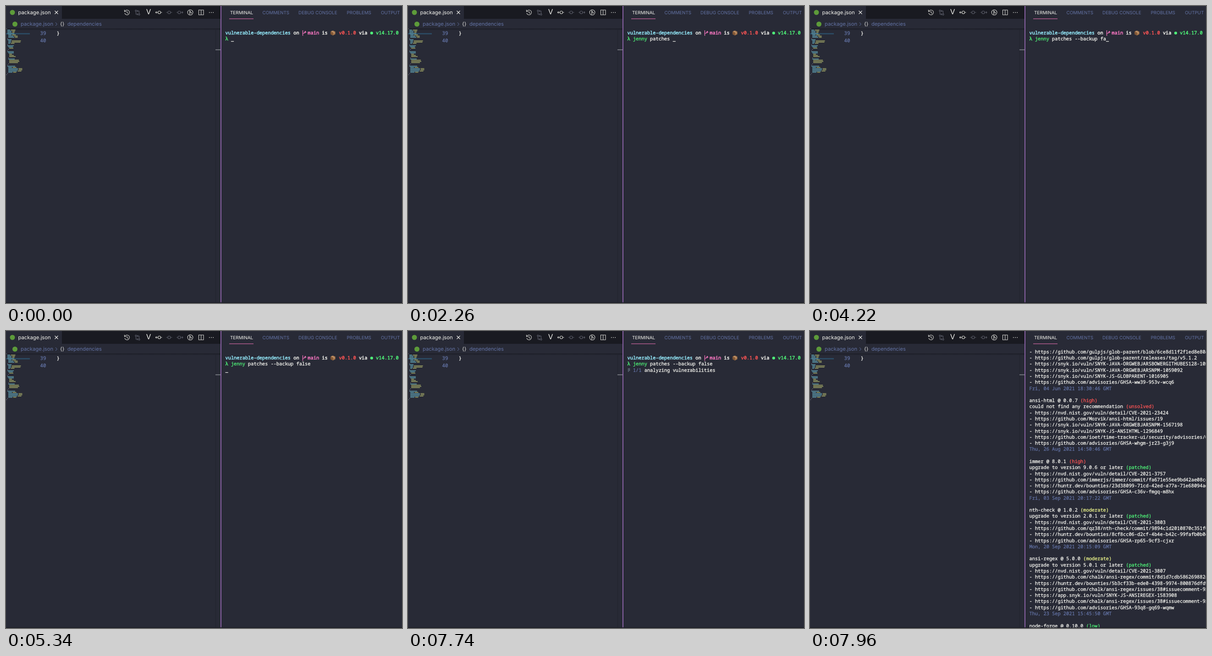
Recreate the animation shown at these times as an HTML page. Size 864x648 px, loop 8 s.

```html
<!DOCTYPE html>
<html lang="en">
<head>
<meta charset="utf-8">
<title>Terminal audit</title>
<style>
html, body { margin: 0; height: 100%; overflow: hidden; background: #282a36; }
svg { display: block; }
text { white-space: pre; text-rendering: geometricPrecision; font-family: Inter, sans-serif; }
.mono text {
  font-family: "Noto Sans Mono", "DejaVu Sans Mono", monospace;
  fill: currentColor; stroke: currentColor; stroke-width: .3px;
}
#term text { font-size: 10.33px; }
#prompt text { stroke-width: .5px; }
#tabs text { font-size: 9.9px; fill: #6272a4; }
#icons { fill: none; stroke: #d8d8d4; stroke-width: 1.1; }
#icons .dim { stroke: #5a5c68; }
</style>
</head>
<body>
<svg width="864" height="648" viewBox="0 0 864 648">
  <defs>
    <linearGradient id="shade" x2="0" y2="1">
      <stop stop-color="#1b1c25"/><stop offset="1" stop-color="#282a36"/>
    </linearGradient>
  </defs>
  <rect width="864" height="648" fill="#282a36"/>

  <!-- editor -->
  <rect x="122" width="346" height="28" fill="#191a21"/>
  <rect y="49" width="468" height="4" fill="url(#shade)"/>
  <g id="map"><rect y="59" width="52" height="3" fill="#2b4860"/></g>
  <circle cx="14" cy="14" r="5.5" fill="#5d9b3a"/>
  <circle cx="19.5" cy="39.5" r="5.5" fill="#5d9b3a"/>
  <g font-size="11.3" fill="#6272a4">
    <text x="26.5" y="18" fill="#f8f8f2">package.json</text>
    <text x="32" y="43.3">package.json</text>
    <text x="134" y="43.3" font-size="11.2">dependencies</text>
    <text x="118" y="43" fill="#e4e4e0" font-size="11">{}</text>
  </g>
  <path d="M106.5 10.5l7 7m0-7l-7 7" stroke="#f0f0ec" stroke-width="1.1"/>
  <path d="M108 36l3.5 3.5-3.5 3.5" fill="none" stroke="#6272a4"/>
  <g class="mono" font-size="10.8" color="#6272a4">
    <text x="74.5" y="62.7">39</text>
    <text x="74.5" y="78.9">40</text>
    <text x="110.5" y="62.7" color="#f8f8f2">}</text>
  </g>
  <path d="M457.5 50v598" stroke="#22232d"/>
  <path d="M457 95.5h11.5" stroke="#83858c" stroke-width="1.6"/>

  <g id="icons">
    <path d="M259.4 11.5a5.3 5.3 0 1 1-.4 4M258.5 8.3v3.7h3.7M264 10.8v3.7l2.8 1.6"/>
    <g class="dim">
      <circle cx="283.5" cy="10.5" r="1.6"/><circle cx="290.5" cy="18.5" r="1.6"/>
      <path d="M283.5 12v6h4m-1.6-1.8l1.8 1.8-1.8 1.8M290.5 17v-6h-4m1.6-1.8l-1.8 1.8 1.8 1.8"/>
    </g>
    <g><circle cx="334.5" cy="14" r="3"/><path d="M337.5 14h3M331.5 14h-5m2-2l-2 2 2 2"/></g>
    <g class="dim"><circle cx="356" cy="14" r="3"/><path d="M349.5 14h3.5m6 0h3.5"/></g>
    <g class="dim"><circle cx="378" cy="14" r="3"/><path d="M372 14h3m6 0h5m-2-2l2 2-2 2"/></g>
    <circle cx="402" cy="14" r="5.8"/>
    <path d="M401 9.5v9M401 11.5l3.5 3v2" stroke-width="1.3"/>
    <path d="M420.5 8.8h10.5v10.4h-10.5zM425.75 9v10"/>
    <path d="M443 14.3h1.6m2.6 0h1.6m2.6 0h1.6" stroke-width="1.6"/>
  </g>
  <text x="305.8" y="18.3" font-size="15.5" fill="#f0f0ec">V</text>

  <!-- panel -->
  <g id="tabs">
    <text x="489" y="17.7" style="fill:#f8f8f2">TERMINAL</text>
    <text x="559.5" y="17.7">COMMENTS</text>
    <text x="638" y="17.7">DEBUG CONSOLE</text>
    <text x="743.5" y="17.7">PROBLEMS</text>
    <text x="818" y="17.7">OUTPUT</text>
  </g>
  <path d="M487 27.8h53" stroke="#c9649f" stroke-width="1.2"/>
  <g id="term" class="mono">
    <g id="session">
      <g id="prompt"></g>
      <path d="M647.5 53v12M647.5 61.5q0-2.5 2.5-2.5h1q2 0 2-2.5M651 58l2-3 2 3" fill="none" stroke="#ff79c6" stroke-width="1.2"/>
      <path d="M708 56l5.3-2.6 5.3 2.6v5.6l-5.3 2.6-5.3-2.6z" fill="#a5754c"/>
      <path d="M708 56l5.3 2.4v5.8l-5.3-2.6z" fill="#7e5535"/>
      <path d="M710.5 54.8l5.3 2.4v2.4" fill="none" stroke="#d8b48a"/>
      <circle cx="797.8" cy="59" r="3.1" fill="#50fa7b"/>
      <g id="typed"></g>
      <g id="busy"></g>
      <rect id="cursor" width="6.2" height="1.2" fill="#f8f8f2"/>
    </g>
    <g id="report"></g>
  </g>
  <path d="M469 0v648" stroke="#a873c8" stroke-width="1.5"/>
  <path d="M0 647.2h864" stroke="#1b1c24" stroke-width="1.6"/>
</svg>

<script>
const $ = id => document.getElementById(id);
const LOOP = 8000, CELL = 6.2, LINE = 13.28;
const RED = '#ff5555', GREEN = '#50fa7b', YELLOW = '#f1fa8c', BLUE = '#6272a4',
      CYAN = '#95ecfd', PINK = '#ff79c6', WHITE = '#f8f8f2';
const colX = col => 478.5 + CELL * col;
const rowY = row => 48.9 + LINE * row;
const put = (col, row, str, color = WHITE) =>
  `<text x="${colX(col)}" y="${rowY(row)}" color="${color}">${str}</text>`;

// Minimap rows: indent, key width, value width
const MAP = `1 1,3 6 10,3 9 6,3 9 5,3 15,5 7 8,5 11 8,5 13 6,3 1,3 9,5 6 20,5 6 19,5 4 8,3 1,
3 14,5 10,7 0 9,5 1,3 1,3 14,5 12,7 0 6,7 0 10,7 0 14,5 1,5 14,7 0 21,7 0 22,7 0 19,5 1,3 1,
3 17,5 8 8,5 21 8,5 21 8,5 19 8,5 9 7,3 1,1 1`;
$('map').innerHTML += MAP.split(',').map((line, i) => {
  const [x, key, value = 0] = line.trim().split(' ').map(Number);
  const bar = (left, w, color) =>
    `<rect x="${left}" y="${49 + i * 2.63}" width="${w}" height="1.7" fill="${color}"/>`;
  return bar(x, key, key > 1 ? '#5b94a5' : '#777983') + bar(x + (key && key + 1.5), value, '#959a62');
}).join('');

$('prompt').innerHTML = [
  [0, 'vulnerable-dependencies', CYAN], [24, 'on', WHITE], [29, 'main', PINK], [34, 'is', WHITE],
  [40, 'v0.1.0', RED], [47, 'via', WHITE], [53, 'v14.17.0', GREEN]
].map(([col, str, color]) => put(col, 1, str, color)).join('') + put(0, 2, 'λ', GREEN);

$('busy').innerHTML = put(2, 3, '1/1', BLUE) + put(6, 3, 'analyzing vulnerabilities') + '<g id="spin"></g>';

const REPORT = `- https://github.com/gulpjs/glob-parent/blob/6ce8d11f2f1ed8e80a
- https://github.com/gulpjs/glob-parent/releases/tag/v5.1.2
- https://snyk.io/vuln/SNYK-JAVA-ORGWEBJARSBOWERGITHUBES128-1059
- https://snyk.io/vuln/SNYK-JAVA-ORGWEBJARSNPM-1059092
- https://snyk.io/vuln/SNYK-JS-GLOBPARENT-1016905
- https://github.com/advisories/GHSA-ww39-953v-wcq6
Fri, 04 Jun 2021 18:30:46 GMT

ansi-html @ 0.0.7 (high)
could not find any recommendation (unsolved)
- https://nvd.nist.gov/vuln/detail/CVE-2021-23424
- https://github.com/Morvik/ansi-html/issues/19
- https://snyk.io/vuln/SNYK-JAVA-ORGWEBJARSNPM-1567198
- https://snyk.io/vuln/SNYK-JS-ANSIHTML-1296849
- https://github.com/ioet/time-tracker-ui/security/advisories/GHSA
- https://github.com/advisories/GHSA-whgm-jr23-g3j9
Thu, 26 Aug 2021 14:50:46 GMT

immer @ 8.0.1 (high)
upgrade to version 9.0.6 or later (patched)
- https://nvd.nist.gov/vuln/detail/CVE-2021-3757
- https://github.com/immerjs/immer/commit/fa671e55ee9bd42ae08cc
- https://huntr.dev/bounties/23d38099-71cd-42ed-a77a-71e68094adfa
- https://github.com/advisories/GHSA-c36v-fmgq-m8hx
Fri, 03 Sep 2021 20:17:22 GMT

nth-check @ 1.0.2 (moderate)
upgrade to version 2.0.1 or later (patched)
- https://nvd.nist.gov/vuln/detail/CVE-2021-3803
- https://github.com/qz38/nth-check/commit/9894c1d2010870c351f66
- https://huntr.dev/bounties/8cf8cc06-d2cf-4b4e-b42c-99fafb0b04d0
- https://github.com/advisories/GHSA-rp65-9cf3-cjxr
Mon, 20 Sep 2021 20:15:09 GMT

ansi-regex @ 5.0.0 (moderate)
upgrade to version 5.0.1 or later (patched)
- https://nvd.nist.gov/vuln/detail/CVE-2021-3807
- https://github.com/chalk/ansi-regex/commit/8d1d7cdb586269882c4
- https://huntr.dev/bounties/5b3cf33b-ede0-4398-9974-800876dfd994
- https://github.com/chalk/ansi-regex/issues/38#issuecomment-924
- https://app.snyk.io/vuln/SNYK-JS-ANSIREGEX-1583908
- https://github.com/chalk/ansi-regex/issues/38#issuecomment-925
- https://github.com/advisories/GHSA-93q8-gq69-wqmw
Thu, 23 Sep 2021 15:45:50 GMT

node-forge @ 0.10.0 (low)`;
const TAGS = { high: RED, unsolved: RED, moderate: YELLOW, patched: GREEN, low: GREEN };
$('report').innerHTML = REPORT.split('\n').map((line, row) =>
  put(0, row, line.replace(/\((\w+)\)$/, (tag, word) => `<tspan color="${TAGS[word]}">${tag}</tspan>`),
    line.endsWith('GMT') ? BLUE : WHITE)).join('');

const COMMAND = 'jenny patches --backup false';
const KEYS = [260, 500, 660, 880, 1040, 1120, 1340, 1460, 1660, 1900, 1980, 2080, 2180, 2260,
  2460, 2600, 2740, 2980, 3020, 3340, 3540, 3700, 3980, 4080, 4220, 4740, 4900, 5000];
const ENTER = 5340, BUSY = 5820, DONE = 7820;
// One dot is missing at each step, walking round the cell
const GAPS = [[1, 3], [0, 3], [0, 2], [0, 1], [0, 0], [1, 0], [1, 1], [1, 2]];

function spinner(step) {
  const [gx, gy] = GAPS[step % GAPS.length];
  let dots = '';
  for (let x = 0; x < 2; x++)
    for (let y = 0; y < 4; y++)
      if (x !== gx || y !== gy)
        dots += `<rect x="${480.2 + x * 2.6}" y="${81.6 + y * 2}" width="1.2" height="1.2" fill="#a3bfd2"/>`;
  return dots;
}

const show = (id, on) => $(id).style.display = on ? '' : 'none';

function draw(t) {
  const done = t >= DONE, busy = t >= BUSY, entered = t >= ENTER;
  show('session', !done);
  show('report', done);
  show('busy', busy);
  show('cursor', !busy);

  const count = KEYS.filter(k => k <= t).length;
  const str = COMMAND.slice(0, count);
  $('typed').innerHTML = put(2, 2, str.slice(0, 5), count < 5 ? RED : GREEN) + put(8, 2, str.slice(6));
  $('cursor').setAttribute('x', colX(entered ? 0 : 2 + count));
  $('cursor').setAttribute('y', rowY(entered ? 3 : 2) + 1.2);
  if (busy) $('spin').innerHTML = spinner(Math.floor((t - BUSY) / 80));
}

function tick() {
  draw(performance.now() % LOOP);
  requestAnimationFrame(tick);
}
tick();
</script>
</body>
</html>
```
